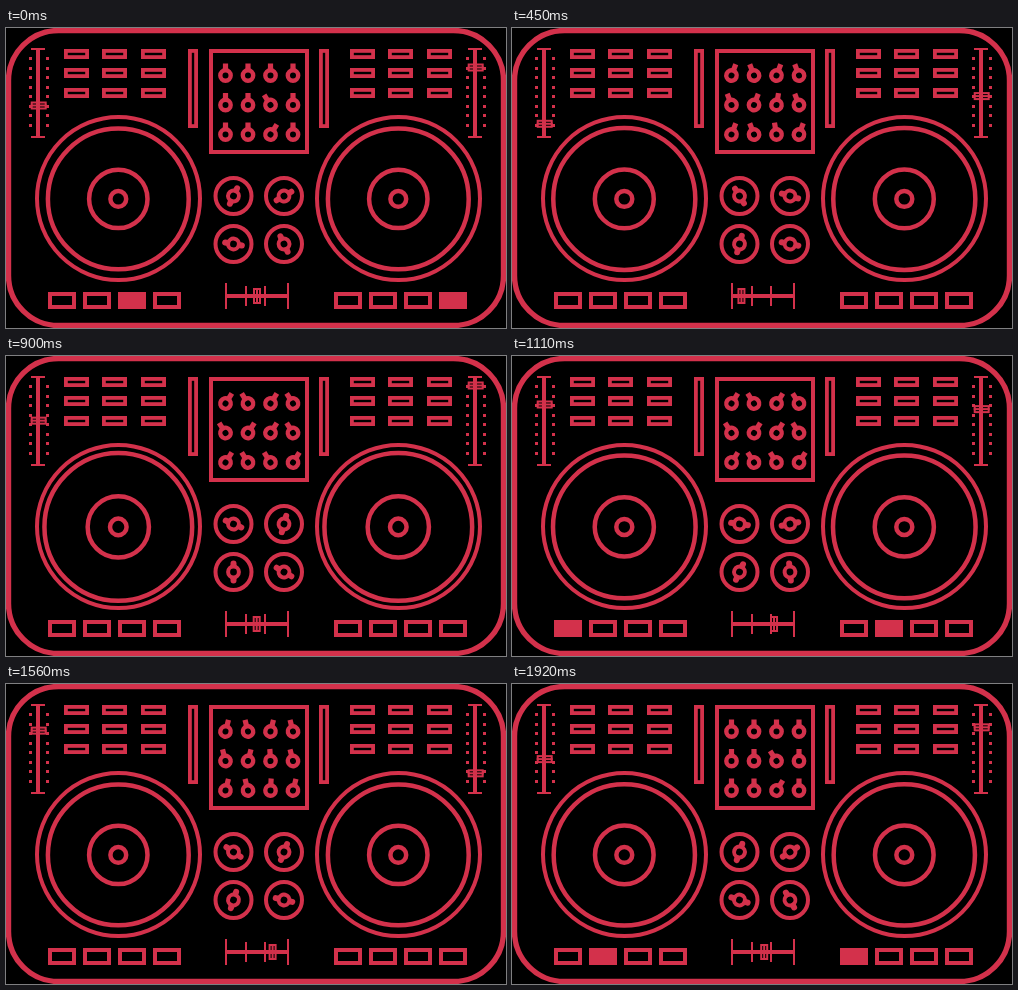
Recreate the animation shown at these times as an HTML page with a canvas. Size 500 by 300 pixels, loop 1950 ms.

```html
<!DOCTYPE html>
<html lang="en">
<head>
<meta charset="utf-8">
<title>DJ controller</title>
<style>
html, body { margin: 0; width: 100%; height: 100%; overflow: hidden; background: #000; }
canvas { display: block; }
</style>
</head>
<body>
<canvas id="stage" width="500" height="300"></canvas>
<script>
const ctx = document.getElementById('stage').getContext('2d');
const LOOP = 1950, STEP = 30, BEAT = 390, PAD_TIME = 540, PAD_LIT = 330;
const RED = '#d3314b';
const clamp = v => Math.min(1, Math.max(0, v));

// Constant-speed moves from start through [time, value] stops to end
function path(start, stops, end = start) {
  const keys = [[0, start], ...stops, [LOOP, end]];
  return t => {
    const i = keys.findIndex(key => key[0] > t);
    const [t0, v0] = keys[i - 1], [t1, v1] = keys[i];
    return v0 + (v1 - v0) * (t - t0) / (t1 - t0);
  };
}

const leftFader = path(77.5, [[480, 97], [1350, 30]]);
const rightFader = path(39.5, [[480, 70], [900, 29.5], [1500, 97]]);
const crossFader = path(251, [[480, 228], [1350, 275]]);
const dialAngles = [
  path(25, [[480, -35], [1350, -100]]),
  path(60, [[480, 110], [900, 195], [1500, 375]], 420),
  path(100, [[480, 10], [900, 0], [1400, 58]], -80),
  path(-25, [[480, -82], [900, -60], [1500, 95]], 155)
];

function line(x1, y1, x2, y2, w) {
  ctx.lineWidth = w;
  ctx.beginPath();
  ctx.moveTo(x1, y1);
  ctx.lineTo(x2, y2);
  ctx.stroke();
}

function ring(x, y, r, w) {
  ctx.lineWidth = w;
  ctx.beginPath();
  ctx.arc(x, y, r, 0, 2 * Math.PI);
  ctx.stroke();
}

// Outline drawn inside the given outer box
function box(x, y, w, h, b) {
  ctx.lineWidth = b;
  ctx.strokeRect(x + b / 2, y + b / 2, w - b, h - b);
}

function turned(x, y, degrees, draw) {
  ctx.save();
  ctx.translate(x, y);
  ctx.rotate(degrees * Math.PI / 180);
  draw();
  ctx.restore();
}

function handle(x, y, degrees) {
  turned(x, y, degrees, () => {
    box(-8, -4, 16, 8, 2);
    line(-8, 0, 8, 0, 2);
  });
}

function pitchFader(x, y) {
  line(x, 20, x, 109, 4);
  for (const end of [21, 109]) line(x - 7, end, x + 7, end, 2);
  for (let i = 0; i < 8; i++)
    for (const side of [-9, 8]) ctx.fillRect(x + side, Math.round(29 + i * 9.55), 3, 3);
  handle(x + 0.7, y, 0);
}

function deck(x, scale) {
  ring(x, 170.5, 81.5, 4);
  for (const r of [70.4, 29.2, 7.9]) ring(x - 0.2, 170.9, r * scale, 4.5);
}

function buttons(left) {
  for (let row = 0; row < 3; row++)
    for (let col = 0; col < 3; col++)
      box(left + Math.floor(38.5 * col), Math.floor(21 + 19.5 * row), 25, 10, 3.8);
}

function pads(left, lit) {
  for (let i = 0; i < 4; i++) {
    box(left + 35 * i, 264, 28, 17, 4);
    if (i === lit) ctx.fillRect(left + 35 * i, 264, 28, 17);
  }
}

// Knobs lean out, rest and return; two of them swing through upright
function mixer(t) {
  box(203, 21, 100, 105, 4);
  const swing = clamp(Math.min(t / 690, (1920 - t) / 800));
  [...'+-+--+w-+-W+'].forEach((kind, i) => {
    const sign = '+w'.includes(kind) ? 1 : -1;
    const lean = 'wW'.includes(kind) ? 2 * swing - 1 : swing;
    turned(219.5 + 22.5 * (i % 4), 47.5 + 29.5 * (i >> 2), 32 * sign * lean, () => {
      ring(0, 0, 5.2, 4.4);
      line(0, -5, 0, -12, 5.2);
    });
  });
}

function dial(x, y, degrees) {
  ring(x, y, 18, 4);
  turned(x, y, degrees, () => {
    ring(0, 0, 5.4, 4);
    ctx.lineCap = 'round';
    for (const s of [-1, 1]) line(0, 7 * s, 0, 8.5 * s, 6);
  });
}

function crossTrack(x) {
  line(220, 268, 282, 268, 4);
  for (const end of [220, 282]) line(end, 255, end, 281, 2);
  for (const mark of [240, 259]) line(mark, 258, mark, 278, 2);
  handle(x, 268, 90);
}

// Ring scale: quick swell, short hold, slow fall
function pulse(t) {
  const p = t % BEAT / BEAT;
  return 1 + 0.055 * clamp(Math.min((p - 0.12) / 0.21, (0.95 - p) / 0.45));
}

function draw(t) {
  ctx.fillStyle = '#000';
  ctx.fillRect(0, 0, 500, 300);
  ctx.fillStyle = ctx.strokeStyle = RED;

  ctx.lineWidth = 5.4;
  ctx.beginPath();
  ctx.roundRect(2.5, 2.5, 495, 295, 50);
  ctx.stroke();

  pitchFader(32, leftFader(t));
  pitchFader(469, rightFader(t));
  for (const left of [58, 344]) buttons(left);
  for (const left of [182, 313]) box(left, 21, 10, 79, 3.8);
  mixer(t);
  for (const x of [112.5, 392.5]) deck(x, pulse(t));
  dialAngles.forEach((angle, i) =>
    dial(227.5 + 50.5 * (i % 2), 168 + 48 * (i >> 1), angle(t)));

  const turn = Math.floor(t / PAD_TIME), on = t % PAD_TIME < PAD_LIT;
  pads(42, on ? (turn + 2) % 4 : -1);
  pads(328, on ? 3 - turn : -1);
  crossTrack(crossFader(t));
}

function tick() {
  draw(Math.floor(performance.now() % LOOP / STEP) * STEP);
  requestAnimationFrame(tick);
}
tick();
</script>
</body>
</html>
```
